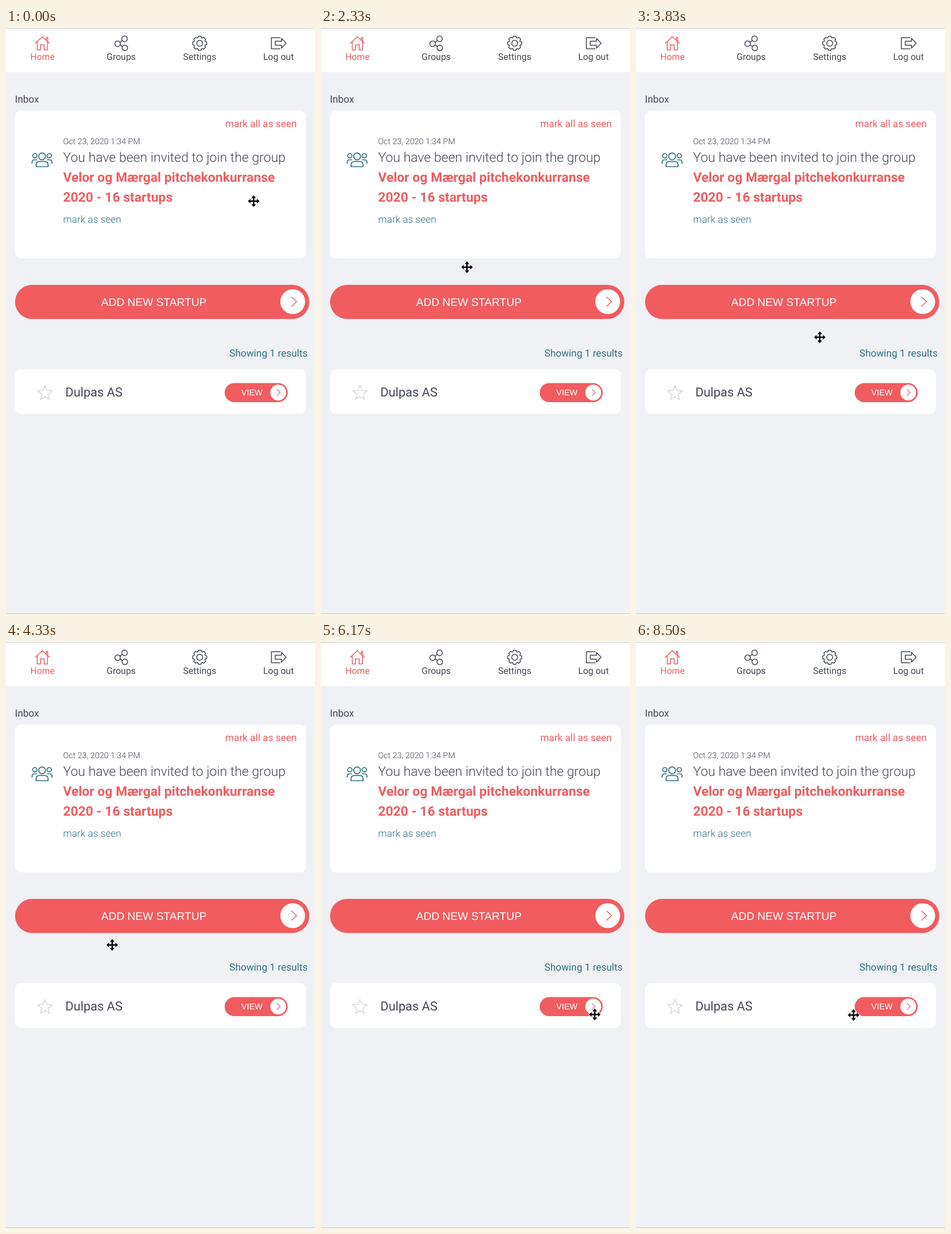
These frames come from a looping animation (544 px wide and 1029 px high, 8.67 s). An HTML page:

```html
<!DOCTYPE html>
<html lang="en">
<head>
<meta charset="utf-8">
<title>Inbox</title>
<style>
  html, body { margin: 0; width: 100%; height: 100%; overflow: hidden; background: #f0f1f5; }
  svg { display: block; width: 100vw; height: 100vh; }
  text { font-family: Roboto, sans-serif; font-size: 17.45px; fill: #434656; text-rendering: geometricPrecision; }
  .nav text { font-size: 16px; text-anchor: middle; }
  .end { text-anchor: end; }
  .light { font-weight: 300; }
  text.red, .red text { fill: #f15c5f; }
  text.teal { fill: #2d7082; }
  .button text { font-family: "Liberation Sans", Arial, sans-serif; fill: #fff; text-anchor: middle; }
  .button rect { fill: #f15c5f; }
  .button circle { fill: #fff; }
  .icon { fill: none; stroke: #434656; stroke-width: 1.5; stroke-linejoin: round; stroke-linecap: round; }
  .red .icon, .button .icon { stroke: #f15c5f; }
  .icon.teal { stroke: #2d7082; stroke-width: 1.7; }
</style>
</head>
<body>
<svg viewBox="0 0 544 1029" preserveAspectRatio="none">
  <rect width="544" height="1029" fill="#f0f1f5"/>
  <rect width="544" height="77.5" fill="#fff"/>
  <path d="M0 .5H544M0 1028.5H544" stroke="#c9cacd"/>

  <g class="nav">
    <g class="red">
      <path class="icon" d="M51.5 27L64 15.2L76.5 27M71 21.5V16.5H73.5V24M55 24.2V38.5H60.8V29.5H67.2V38.5H73V24.2"/>
      <text x="64.3" y="56">Home</text>
    </g>
    <g class="icon">
      <circle cx="208.7" cy="19" r="4.9"/>
      <circle cx="196.5" cy="27.6" r="4.9"/>
      <circle cx="209.2" cy="34.9" r="4.9"/>
      <path d="M200.6 24.8L204.6 21.9M200.8 30L204.9 32.4"/>
    </g>
    <text x="202.7" y="56">Groups</text>
    <path id="gear" class="icon" transform="translate(341 26.8)"/>
    <circle class="icon" cx="341" cy="26.8" r="5.2"/>
    <text x="341" y="56">Settings</text>
    <path class="icon" d="M482.5 17H467.2V36.5H482.5M474 23.2H485V18.3L493.2 26.8L485 35.2V30.3H474Z"/>
    <text x="479.7" y="56">Log out</text>
  </g>

  <text x="15.7" y="131">Inbox</text>
  <rect x="16" y="145" width="512" height="259.5" rx="10" fill="#fff"/>
  <text class="red end" x="512" y="173.5">mark all as seen</text>
  <g class="icon teal">
    <circle cx="63.5" cy="225.3" r="6"/>
    <path d="M53 243.5V240Q53 234.3 59 234.3H68Q74 234.3 74 240V243.5Z"/>
    <circle cx="50.8" cy="224.3" r="3.8"/>
    <circle cx="76.2" cy="224.3" r="3.8"/>
    <path d="M46 237.5V235.5Q46 231.5 50 231.5H54M81 237.5V235.5Q81 231.5 77 231.5H73"/>
  </g>
  <text class="light" x="100.5" y="204" font-size="14.5" style="font-size:14.5px">Oct 23, 2020 1:34 PM</text>
  <text class="light" x="100.5" y="235" style="font-size:23.27px">You have been invited to join the group</text>
  <g class="red" font-weight="700">
    <text x="100.5" y="270" style="font-size:23.15px">Velor og Mærgal pitchekonkurranse</text>
    <text x="100.5" y="305" style="font-size:23.15px">2020 - 16 startups</text>
  </g>
  <text class="teal light" x="100.5" y="341.5">mark as seen</text>

  <g class="button">
    <rect x="16" y="451" width="518" height="60" rx="30"/>
    <text x="260.3" y="487.5" style="font-size:19.4px">ADD NEW STARTUP</text>
    <circle cx="504.8" cy="480.5" r="21.8"/>
    <path class="icon" d="M503 472.5L511.5 480.5L503 488.5"/>
  </g>

  <text class="teal end" x="531" y="576.5">Showing 1 results</text>
  <rect x="16" y="599" width="512" height="78.5" rx="10" fill="#fff"/>
  <path id="star" class="icon" transform="translate(68.6 641.3)" style="stroke:#d6d7da"/>
  <text x="104.5" y="647" style="font-size:22px">Dulpas AS</text>
  <g class="button">
    <rect x="385" y="623.5" width="111" height="33.5" rx="16.75"/>
    <text x="433" y="645.2" style="font-size:14.6px">VIEW</text>
    <circle cx="479.3" cy="640.2" r="13.9"/>
    <path class="icon" d="M477.3 634.7L482.6 640.2L477.3 645.7" style="stroke-width:1.2"/>
  </g>

  <path id="cursor" fill="#000" stroke="#fff" stroke-width="1.8" stroke-linejoin="round" paint-order="stroke"/>
</svg>
<script>
const LOOP = 8670, FPS = 6;
const byId = id => document.getElementById(id);

// Repeats a list of points around the centre and closes the outline.
function radial(count, points) {
  const out = [];
  for (let i = 0; i < count; i++) {
    const a = i * 2 * Math.PI / count, c = Math.cos(a), s = Math.sin(a);
    for (const [x, y] of points) out.push([(x * c - y * s).toFixed(2), (x * s + y * c).toFixed(2)]);
  }
  return 'M' + out.join('L') + 'Z';
}

byId('gear').setAttribute('d', radial(8, [[-3.4, -9.6], [-2.2, -12.4], [2.2, -12.4], [3.4, -9.6]]));
byId('star').setAttribute('d', radial(5, [[0, -13.6], [3.5, -4.8]]));
const cursor = byId('cursor');
cursor.setAttribute('d', radial(4, [[-1.3, -1.3], [-1.3, -5.6], [-4.2, -5.6], [0, -10.2], [4.2, -5.6], [1.3, -5.6]]));

// Pointer stops: step, x, y.
const stops = [
  [0, 436, 304], [3, 386, 368], [6, 319, 428], [10, 283, 428], [14, 257, 420],
  [16, 315, 445], [19, 444, 490], [21, 425, 538], [24, 270, 541], [26, 187, 532],
  [28, 150, 560], [29, 150, 560], [31, 107, 650], [33, 170, 735], [36, 445, 675],
  [37, 482, 654], [39, 300, 706], [41, 110, 708], [43, 112, 690], [45, 300, 685],
  [46, 420, 668], [48, 383, 655], [52, 383, 655]
];

function hermite(i, axis, u) {
  const slope = k => {
    const a = stops[Math.max(k - 1, 0)], b = stops[Math.min(k + 1, stops.length - 1)];
    return (b[axis] - a[axis]) / (b[0] - a[0]);
  };
  const [a, b] = [stops[i], stops[i + 1]], span = b[0] - a[0], d = b[axis] - a[axis];
  if (a[1] === b[1] && a[2] === b[2]) return a[axis];
  const m = slope(i) * span, n = slope(i + 1) * span;
  return a[axis] + u * (m + u * (3 * d - 2 * m - n + u * (m + n - 2 * d)));
}

function draw(ms) {
  const step = Math.floor((ms % LOOP + 3.4) * FPS / 1000);
  let i = 0;
  while (i < stops.length - 2 && stops[i + 1][0] <= step) i++;
  const u = Math.min(1, (step - stops[i][0]) / (stops[i + 1][0] - stops[i][0]));
  cursor.setAttribute('transform', `translate(${hermite(i, 1, u).toFixed(1)} ${hermite(i, 2, u).toFixed(1)})`);
}

const start = performance.now();
function tick() {
  draw(performance.now() - start);
  requestAnimationFrame(tick);
}
tick();
</script>
</body>
</html>
```
